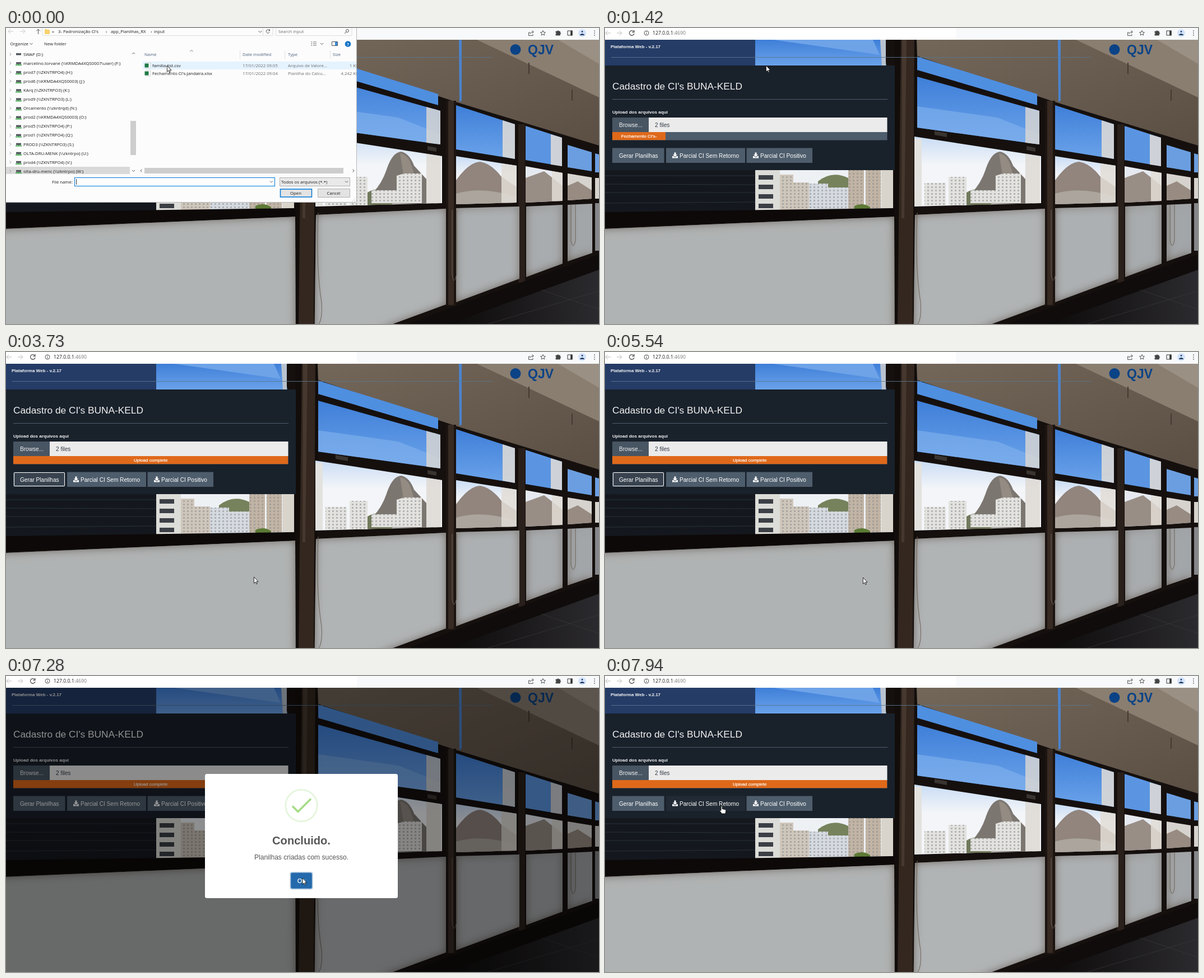
Write an HTML page that moves like this. It is 1058 by 529 pixels and loops after 8 s.

```html
<!DOCTYPE html>
<html lang="pt">
<head>
<meta charset="utf-8">
<title>Envio de planilhas</title>
<style>
html, body { margin: 0; width: 100%; height: 100%; overflow: hidden; background: #120e0c; }
svg { display: block; width: 1058px; height: 529px; font-family: "Liberation Sans", Arial, sans-serif; }
text { white-space: pre; }
.ui { font: 7.75px "Open Sans", "Noto Sans", sans-serif; fill: #1c1c1c; }
.dim { fill: #6d6d6d; }
.head { fill: #4c607a; }
.line { fill: none; stroke: #555; stroke-width: 1; }
.btn text { font-size: 10.1px; fill: #fff; }
.mid { text-anchor: middle; }
</style>
</head>
<body>
<svg viewBox="0 0 1058 529">
  <defs>
    <linearGradient id="sky" x2="0" y2="1"><stop stop-color="#3f7fd8"/><stop offset="1" stop-color="#6ba3ea"/></linearGradient>
    <linearGradient id="haze" x2="0" y2="1"><stop stop-color="#c9dcf5"/><stop offset=".4" stop-color="#f3f5f8"/></linearGradient>
    <linearGradient id="blind" x2="1" y2="1"><stop stop-color="#73675a"/><stop offset="1" stop-color="#5b4f44"/></linearGradient>
    <linearGradient id="floor" x2="1" y2="0"><stop stop-color="#0d0b0a"/><stop offset="1" stop-color="#2b2a2e"/></linearGradient>
    <pattern id="panes" width="7" height="6" patternUnits="userSpaceOnUse"><path d="M1 1h3v3h-3z" fill="#8b8d90" opacity=".55"/></pattern>
    <filter id="inset" x="0" y="0" width="1" height="1">
      <feComponentTransfer in="SourceAlpha"><feFuncA type="table" tableValues="1 0"/></feComponentTransfer>
      <feGaussianBlur stdDeviation="8"/>
      <feComposite in2="SourceAlpha" operator="in" result="rim"/>
      <feFlood flood-color="#65574a"/>
      <feComposite in2="rim" operator="in" result="edge"/>
      <feMerge><feMergeNode in="SourceGraphic"/><feMergeNode in="edge"/></feMerge>
    </filter>
    <clipPath id="barClip"><rect id="barRect" x="13" y="186" width="0" height="14.500"/></clipPath>
    <clipPath id="treeClip"><path d="M0 40H234V261H0z"/></clipPath>
    <clipPath id="listClip"><path d="M0 0H626V312H0z"/></clipPath>
    <g id="download" fill="#fff"><path d="M3.5 0h3v3.7h2.6L5 7.7.9 3.7h2.6z"/><path d="M0 6.6h2.4L5 9l2.6-2.4H10V10H0z"/></g>
  </defs>

  <!-- room with windows -->
  <g id="photo">
    <path d="M0 21H1058V529H0z" fill="#15100e"/>
    <path d="M0 21H268V68H0z" fill="#253c66"/>
    <path d="M268 21H495L502 68H268z" fill="url(#sky)"/>
    <path d="M300 21H478L490 48z" fill="#6ea3e8"/>
    <path d="M491 21H501V68H494z" fill="#b9c3cf"/>
    <path d="M0 254H268V329H0z" fill="#14181e"/>
    <path d="M0 264H268M0 279L268 280M0 294H268M0 313L268 311" stroke="#29313b" fill="none"/>
    <path d="M268 254H514V323L268 328z" fill="#eef1f4"/>
    <path d="M380 274Q405 254 434 268V300H380z" fill="#76825c"/>
    <g id="town">
      <path d="M268 254H312V327H268z" fill="#dcdcd8"/>
      <path d="M274 263h26v8h-26zM274 280h26v8h-26zM274 297h26v8h-26zM274 314h26v8h-26z" fill="#3c4046"/>
      <path d="M312 262H336V276H364V326H312z" fill="#cfc6bb"/>
      <path d="M364 278H398V285H434V324H364z" fill="#d5dae0"/>
      <path d="M434 254H462V323H434zM465 254H492V322H465z" fill="#c2b4a4"/>
      <path d="M312 262H336V276H364V326H312zM364 278H398V285H434V324H364zM434 254H462V323H434zM465 254H492V322H465z" fill="url(#panes)"/>
      <path d="M445 318q15-7 28 2v3h-28z" fill="#5c7a35"/>
      <path d="M493 254H514V322H493z" fill="#d9d4cb"/>
    </g>
    <path d="M516 21H556V529H516z" fill="#120d0b"/>
    <path d="M528 21H552L549 529H522z" fill="#33271f"/>
    <path d="M530 21H538L534 340H529z" fill="#46382e"/>

    <path d="M556 21H1058V210L802 132 557 50z" fill="url(#blind)"/>
    <path d="M840 21H1058V124z" fill="#8a7e71"/>
    <path d="M985 21H1058V64z" fill="#9b9084"/>
    <path d="M808 21H813V130L809 132z" fill="#4b83cd"/>
    <path d="M933 62V82M1010 110V130" stroke="#463a31" stroke-width="2"/>

    <path d="M557 51L771 118V138L557 75z" fill="#4f8fe0"/>
    <path d="M557 87L775 148V208L557 178z" fill="url(#sky)"/>
    <path d="M557 140L700 160 775 190V208L557 178z" fill="#82b2ef" opacity=".6"/>
    <path d="M552 194L778 229V313L552 319z" fill="url(#haze)"/>
    <path d="M655 294Q672 276 680 250Q690 222 705 221Q720 224 728 246L750 270V314H655z" fill="#7c7671"/>
    <path d="M703 224Q718 226 724 248L734 280H712z" fill="#948b82"/>
    <path d="M645 294Q660 284 676 294L690 316H645z" fill="#717a5c"/>
    <path d="M552 198H565V318H552zM570 277H608V317H570zM613 266H645V317H613zM652 290H697V264L710 260H742V313H652z" fill="#e3e2df"/>
    <path d="M570 277H608V317H570zM613 266H645V317H613zM652 290H697V264L710 260H742V313H652z" fill="url(#panes)"/>
    <path d="M750 141L775 148V208L750 205zM750 225L776 229V313H750z" fill="#ded9d3" opacity=".8"/>
    <path d="M588 184l22 4v7l-22-4zM752 211l16 3v7l-16-3z" fill="#3a3430"/>
    <path d="M785 130H803V497H785z" fill="#1b1411"/><path d="M789 130H799V495H789z" fill="#362a23"/>

    <path d="M803 138L908 172V234L803 217z" fill="url(#sky)"/>
    <path d="M803 229L911 246V312L803 315z" fill="url(#haze)"/>
    <path d="M803 272Q826 240 846 239Q866 242 884 266L911 284V312L803 315z" fill="#91857e"/>
    <path d="M803 296Q850 282 911 302V312L803 315z" fill="#aba59d"/>
    <path d="M886 165L908 172V234L886 230zM884 242L911 246V312H884z" fill="#e2ddd6" opacity=".85"/>
    <path d="M914 172H926V455H914z" fill="#2a201b"/>

    <path d="M927 175L992 196V247L927 236z" fill="#5b95e2"/>
    <path d="M927 247L993 259V309L927 312z" fill="#e6eaf0"/>
    <path d="M927 268L960 256 993 282V309L927 312z" fill="#998e86"/>
    <path d="M972 190L992 196V247L972 244zM974 256L993 259V309H974z" fill="#e2ddd6" opacity=".85"/>

    <path d="M1002 209L1045 222V256L1002 249zM1051 224L1058 226V258H1051z" fill="#6b9ee0"/>
    <path d="M1002 260L1045 267V305L1002 308zM1051 268H1058V305H1051z" fill="#d6d3ce"/>
    <path d="M1002 282L1020 274 1045 290V305L1002 308z" fill="#978b82"/>
    <path d="M690 540L785 503 1058 405V529z" fill="#0f0c0b"/>
    <path d="M790 529L1058 432V529z" fill="url(#floor)"/>
    <path d="M860 529L1058 470M955 468L1058 503" stroke="#3d3c40" fill="none" opacity=".6"/>

    <!-- frosted panels -->
    <g filter="url(#inset)">
      <path d="M-50 361L516 337 517 590H-50z" fill="#b0b3b3"/>
      <path d="M553 334L785 323V494L690 529 550 590z" fill="#b1b4b5"/>
      <path d="M803 322L916 319V448L803 490z" fill="#adb0b2"/>
      <path d="M928 319L993 316V421L928 445z" fill="#a9acae"/>
      <path d="M1002 316L1046 314V402L1002 417z" fill="#a3a6a8"/>
    </g>
    <path d="M0 329L516 322V337L0 357z" fill="#0d0908"/>
    <path d="M1051 313H1058V398H1051z" fill="#85878a"/>
    <path d="M557 330Q553 430 563 490Q565 520 558 529M796 325V440Q799 462 804 440V325M1008 316V380Q1012 398 1016 380V316" fill="none" stroke="#6c6257"/>
  </g>

  <!-- web page -->
  <text x="10" y="36" font-size="8" font-weight="700" fill="#f4f4f4">Plataforma Web - v.2.17</text>
  <path d="M11 52.5H867" stroke="#5a7690" stroke-width=".9"/>
  <circle cx="909" cy="38.5" r="9.5" fill="#0b4386"/>
  <text x="931" y="47" font-size="23" font-weight="700" fill="#0b4386">QJV</text>
  <path d="M0 67H517V254H0z" fill="#19212b"/>
  <text x="13" y="110" font-size="17.3" fill="#f3f3f3">Cadastro de CI's BUNA-KELD</text>
  <path d="M13 127.5H504" stroke="#4e5d6c"/>
  <text x="13" y="153" font-size="8.1" font-weight="700" fill="#f2f2f2">Upload dos arquivos aqui</text>
  <path d="M78 160H503.500V186H78z" fill="#ebebeb"/>
  <path d="M13 160H78V186H13z" fill="#485563"/>
  <text x="25" y="177" font-size="10.1" fill="#f0f0f0">Browse...</text>
  <text id="picked" x="89" y="177" font-size="10.1" fill="#333c46"></text>
  <g id="progress">
    <path d="M13 186H503.500V200.500H13z" fill="#4e5d6c"/>
    <g clip-path="url(#barClip)">
      <path d="M13 186H503.500V200.500H13z" fill="#df691a"/>
      <text id="barText" class="mid" y="196" font-size="8.1" fill="#fff" stroke="#fff" stroke-width=".2"></text>
    </g>
  </g>
  <g class="btn">
    <rect id="make" x="13" y="214.500" width="92.500" height="26.500"/>
    <rect id="makeRing" x="14.500" y="215.500" width="90" height="24" rx="1.5" fill="none" stroke="#fff"/>
    <text x="25" y="231.500">Gerar Planilhas</text>
    <rect id="none" x="109" y="214.500" width="141" height="26.500"/>
    <use href="#download" x="120" y="222.500"/><text x="133" y="231.500">Parcial CI Sem Retorno</text>
    <rect x="252.500" y="214.500" width="117.500" height="26.500" fill="#4e5d6c"/>
    <use href="#download" x="264" y="222.500"/><text x="277" y="231.500">Parcial CI Positivo</text>
  </g>

  <path id="shade" d="M0 21H1058V529H0z"/>

  <!-- alert -->
  <g id="alert">
    <rect x="355" y="175" width="344" height="222" rx="3.5" fill="#fff"/>
    <circle cx="527" cy="231.500" r="28.300" fill="none" stroke="#e4f5db" stroke-width="2.700"/>
    <path id="check" pathLength="1" stroke-dasharray="1 2" d="M512 233.500L521 242.500 543 220.500" fill="none" stroke="#a5dc86" stroke-width="3.600" stroke-linecap="round"/>
    <g class="mid" fill="#575757">
      <text x="527" y="301" font-size="20.1" font-weight="700">Concluido.</text>
      <text x="527" y="328" font-size="12.050">Planilhas criadas com sucesso.</text>
      <rect x="506.500" y="350" width="41" height="31.500" rx="4" fill="#aec6de"/>
      <rect id="ok" x="508.200" y="351.700" width="37.600" height="28" rx="2.700"/>
      <text x="527" y="369.500" font-size="11.2" fill="#fff" stroke="#fff" stroke-width=".25">Ok</text>
    </g>
  </g>

  <!-- browser bar -->
  <path d="M0 0H1058V21H0z" fill="#f8f9fa"/><path d="M0 0H626V21H0z" fill="#fff"/>
  <g class="line">
    <path d="M10 9H1M5 5L1 9 5 13M21 9H30M26 5L30 9 26 13" stroke="#bbb"/>
    <path d="M51 6A4.300 4.300 0 1 0 52 10M52 4V7.500H48.500" stroke-width="1.3"/>
    <circle cx="74" cy="9" r="4"/><path d="M74 8V11.500M74 6V7"/>
    <path d="M935 8H932.500V13.500H940V11M935 11Q935 7 941 7M938.500 4.500L941.500 7 938.500 9.500"/>
    <path d="M958 4.500L959.300 7.500 962.500 7.800 960 10 960.800 13 958 11.300 955.200 13 956 10 953.500 7.800 956.700 7.500z"/>
    <path d="M981 6H983.500Q985 3 986.500 6H988.500V8Q991 9.300 988.500 11V13H981V11Q983 9.300 981 8z" fill="#444"/>
    <path d="M1002 5H1010.500V13H1002z" stroke="#333"/><path d="M1007.500 5H1010.500V13H1007.500z" fill="#333"/>
    <circle cx="1028" cy="9" r="7" fill="#d3e3fd" stroke="none"/>
    <path d="M1024 12.500Q1028 8.500 1032 12.500zM1028 5.500a1 1 0 1 0 .1 0" fill="#27405f" stroke="#27405f"/>
    <path d="M1050 4.500v1.500M1050 8.300v1.500M1050 12v1.500" stroke-width="1.7"/>
  </g>
  <text class="ui" x="85" y="12" style="font-size:8.7px">127.0.0.1<tspan fill="#777">:4690</tspan></text>

  <!-- file dialog -->
  <g id="dialog" class="ui" clip-path="url(#listClip)">
    <path d="M0 0H626V312H0z" fill="#fcfcfc"/>
    <path d="M65 -2V13.500H476V-2M458.500 -2V13M481.500 -2V13.500H617V-2" class="line" style="stroke:#dedede"/>
    <g class="line">
      <path d="M13 6H4M8 2L4 6 8 10M25 6H34M30 2L34 6 30 10" stroke="#c8c8c8"/>
      <path d="M57.500 11V2M54 5.500L57.500 2 61 5.500"/>
      <path d="M450.500 5L453.500 8 456.500 5M470 4A3.200 3.200 0 1 0 470.300 7.500M470.500 2V5H468"/>
      <circle cx="609" cy="5" r="2.500"/><path d="M607 7L604 10"/>
      <path d="M42.500 27L45 29.500 47.500 27M561 27L563.500 29.500 566 27" />
      <path d="M544 25h2.500M544 28h2.500M544 31h2.500M548 25h6M548 28h6M548 31h6" stroke="#777"/>
      <path d="M581.500 24.500h10v7h-10z"/><path d="M587 25h4v6h-4z" style="fill:#3e8ddd;stroke:none"/>
      <path d="M328 42L331 39.500 334 42" stroke="#888"/>
      <path d="M417.500 40V55M497.500 40V55M578.500 40V55" style="stroke:#e2e2e2"/>
      <path d="M225 46.500L227.500 44 230 46.500M225 254L227.500 256.500 230 254M242.500 252.500L240 255 242.500 257.500M618.500 252.500L621 255 618.500 257.500"/>
    </g>
    <path d="M69 2h3l1 1h5v8h-9z" fill="#f7d26b"/>
    <circle cx="610" cy="28.500" r="5.300" fill="#1173c7"/><text class="mid" x="610" y="31.500" style="fill:#fff;font-weight:700">?</text>
    <path d="M222 166H232V227H222zM247 250H602V260H247z" fill="#cdcdcd"/>
    <g id="tree" clip-path="url(#treeClip)"></g>
    <g id="files"></g>
    <rect id="nameBox" x="122.500" y="267.500" width="357" height="15" fill="#fff"/>
    <path id="caret" d="M125.500 270V280" stroke="#000" stroke-width=".8"/>
    <text id="fileName" x="125" y="278"></text>
    <path d="M488.500 267.500H613.500V282.500H488.500z" fill="#e9e9e9" stroke="#b0b0b0"/>
    <path d="M489.500 288H545.500V302H489.500z" fill="#e3e3e3" stroke="#0078d7" stroke-width="1.500"/>
    <path d="M556.500 287.500H613.500V302.500H556.500z" fill="#e3e3e3" stroke="#b0b0b0"/>
    <path class="line" d="M471 273.500L473.500 276 476 273.500M605 273.500L607.500 276 610 273.500"/>
    <path d="M622.500 304v6M620 307v3M618 309v1" stroke="#bbb" stroke-dasharray="1 1.500"/>
    <path d="M0 311.500H625.500V0" fill="none" stroke="#a5a5a5" stroke-width=".8"/>
  </g>

  <g id="cursor">
    <path id="arrow" d="M.4 0V11.300L3 8.900 4.700 12.700 6.300 12 4.700 8.300H8z" fill="#fff" stroke="#000" stroke-width=".8"/>
    <path id="hand" d="M-1 1.200Q0-.6 1.200 1.200V5.500L6.500 6.700Q8 7.200 7.800 9L6.800 14H.3L-3.200 9Q-3.700 7.500-2.300 7.500L-1 8.800z" fill="#fff" stroke="#000" stroke-width=".8"/>
  </g>
</svg>
<script>
const $ = id => document.getElementById(id);
function add(parent, tag, attrs, text) {
  const node = document.createElementNS("http://www.w3.org/2000/svg", tag);
  for (const key in attrs) node.setAttribute(key, attrs[key]);
  if (text) node.textContent = text;
  return parent.appendChild(node);
}
const set = (id, key, value) => $(id).setAttribute(key, value);
const show = (id, on) => set(id, "visibility", on ? "visible" : "hidden");

const label = (x, y, text, cls = "") => add($("dialog"), "text", { x, y, class: cls }, text);
label(82, 8.5, "«"); label(93, 8.5, "3- Padronização CI's"); label(178, 8.5, "›");
label(187, 8.5, "app_Planilhas_RX"); label(258, 8.5, "›"); label(264, 8.5, "input");
label(486, 8.5, "Search input", "dim");
label(7.5, 31, "Organize"); label(68, 31, "New folder");
[[247, "Name"], [422, "Date modified"], [503, "Type"], [583, "Size"]].forEach(([x, s]) => label(x, 50, s, "head"));
label(82, 277.5, "File name:"); label(491, 277.5, "Todos os arquivos (*.*)");
label(517, 297.5, "Open", "mid"); label(584.5, 297.5, "Cancel", "mid");

const farm = "KRMDA4XQS000", host = "ZKNTRPO";
const drives = [
  ["SWAP", "", "D"], ["marcelino.torvane", farm + "7\\user", "F"], ["prod7", host + 4, "H"],
  ["prod6", farm + 3, "J"], ["KArq", host + 3, "K"], ["prod9", host + 3, "L"],
  ["Orcamento", "zkntrqd", "N"], ["prod2", farm + 3, "O"], ["prod5", host + 4, "P"],
  ["prod1", host + 4, "Q"], ["PROD3", host + 3, "S"], ["OLTA-DRU-MENK", "zkntrpo", "U"],
  ["prod4", host + 4, "V"], ["olta-dru-menc", "zkntrpo", "W"]
];
add($("tree"), "rect", { y: 248, width: 221, height: 14, fill: "#d9d9d9" });
const chevrons = add($("tree"), "g", { class: "line" });
drives.forEach(([name, server, letter], i) => {
  const y = 47 + i * 16.07;
  add(chevrons, "path", { d: `M6.500 ${y - 2.500}l2.500 2.500-2.500 2.500`, style: "stroke:#a0a0a0" });
  add($("tree"), "path", { d: `M18 ${y - 2}h9v3.500h-9z`, fill: "#50565b" });
  if (server) add($("tree"), "path", { d: `M17 ${y + 3}h11M22.500 ${y + 1}v2`, stroke: "#3ea34a", "stroke-width": 1.8 });
  add($("tree"), "text", { x: 31, y: y + 2.8 }, name + (server && ` (\\\\${server})`) + ` (${letter}:)`);
});

const bigFile = "Fechamento CI's-Jandaira.xlsx", smallFile = "familia-list.csv";
const rows = [
  [smallFile, "17/01/2022 09:05", "Arquivo de Valore...", "1 KB"],
  [bigFile, "17/01/2022 09:04", "Planilha do Calcu...", "4.242 KB"]
].map(([name, date, kind, size], i) => {
  const g = $("files"), y = 67 + i * 14;
  const back = add(g, "rect", { x: 244, y: y - 7, width: 382, height: 14 });
  add(g, "path", { d: `M250 ${y - 5}h8v10h-8z`, fill: "#fff", stroke: "#bbb", "stroke-width": .6 });
  add(g, "rect", { x: 247.5, y: y - 3.5, width: 7, height: 7, fill: "#1f7a46" });
  add(g, "text", { x: 261, y: y + 2.8 }, name);
  add(g, "text", { x: 422, y: y + 2.8, class: "dim" }, date);
  add(g, "text", { x: 503, y: y + 2.8, class: "dim" }, kind);
  add(g, "text", { x: 629, y: y + 2.8, class: "dim", "text-anchor": "end" }, size);
  return back;
});

const ticks = [0, 150, 300, 580, 1010, 1160, 1300, 1420, 1550, 1670, 1820, 1970, 2120, 2240, 2360, 2480,
  2630, 2770, 2900, 3460, 3580, 3730, 5540, 5690, 5810, 5930, 6080, 6200, 6350, 6470, 6620, 6770, 6890,
  7040, 7160, 7280, 7430, 7550, 7700, 7820, 7940];

// Keys are [time, value, ...]; values run straight from key to key.
function track(keys, t) {
  const i = keys.findLastIndex(k => k[0] <= t);
  if (i < 0) return keys[0].slice(1);
  const a = keys[i], b = keys[i + 1] || a;
  const p = b === a ? 0 : (t - a[0]) / (b[0] - a[0]);
  return a.slice(1).map((v, j) => v + (b[j + 1] - v) * p);
}
const pointer = [[0, 287, 67], [1970, 287, 67], [2360, 18, 203], [2480, 66, 239], [2630, 73, 223], [2900, 73, 223],
  [3580, 368, 422], [3730, 442, 402], [5540, 460, 403], [5810, 822, 338], [5930, 817, 330], [6200, 817, 330],
  [6470, 838, 330], [6620, 689, 337], [6890, 566, 357], [7160, 528.5, 361], [7280, 528.5, 361],
  [7550, 265, 265], [7940, 208, 232]];
const barEnd = [[1160, 13], [1300, 40], [1420, 108], [1670, 353], [1820, 461], [1970, 499], [2120, 503.5]];
const shade = [[5540, 0], [5690, .15], [5810, .35], [5930, .41], [7280, .41], [7550, 0]];
const zoom = [[5690, .7], [5810, .85], [5930, 1.04], [6080, .96], [6200, 1], [7280, 1], [7550, .6]];
const fade = [[5540, 0], [5810, 1], [7280, 1], [7550, 0]];
const tickMark = [[6080, 0], [6470, 1]];
const chevronFade = [[0, 1], [150, .7], [300, .4], [580, 0]];

function draw(t) {
  const between = (a, b) => t >= a && t < b;

  set("dialog", "display", t < 1010 ? "inline" : "none");
  show("caret", t < 150);
  chevrons.setAttribute("opacity", track(chevronFade, t)[0]);
  set("nameBox", "stroke", t < 150 ? "#0078d7" : "#b0b0b0");
  $("fileName").textContent = t < 150 ? "" : t < 300 ? smallFile : `"${bigFile}" "${smallFile}"`;
  rows[0].setAttribute("fill", t < 150 ? "#e5f3ff" : "#cce8ff");
  rows[1].setAttribute("fill", t < 300 ? "none" : "#cce8ff");

  $("picked").textContent = t < 1160 ? "No file selected" : "2 files";
  const end = track(barEnd, t)[0], done = t >= 1550;
  show("progress", t >= 1160);
  set("barRect", "width", end - 13);
  set("barText", "x", Math.max((end + 13) / 2, 46));
  $("barText").textContent = done ? "Upload complete" : bigFile.split("-")[0] + "-";

  const focused = between(2900, 5690) || between(7550, 7820);
  set("make", "fill", between(2770, 3460) ? "#28323c" : focused ? "#38434f" : "#4e5d6c");
  show("makeRing", focused);
  set("none", "fill", t >= 7940 ? "#222b35" : t >= 7820 ? "#39444f" : "#4e5d6c");

  set("shade", "opacity", track(shade, t)[0]);
  const s = track(zoom, t)[0], mark = track(tickMark, t)[0];
  set("alert", "opacity", track(fade, t)[0]);
  set("alert", "transform", `translate(527 286) scale(${s}) translate(-527 -286)`);
  set("check", "stroke-dashoffset", 1 - mark);
  set("check", "opacity", mark > 0 ? 1 : 0);
  set("ok", "fill", t >= 7160 ? "#2469ab" : t >= 7040 ? "#2b78c1" : "#3085d6");

  const [x, y] = track(pointer, t);
  const hand = between(2480, 3460) || t >= 7820;
  set("cursor", "transform", `translate(${x} ${y})`);
  show("arrow", !hand);
  show("hand", hand);
}

const start = performance.now();
let last = -1;
function frame(now) {
  const t = Math.max(0, now - start) % 8000;
  const tick = ticks.findLast(v => v <= t);
  if (tick !== last) draw(last = tick);
  requestAnimationFrame(frame);
}
draw(0);
requestAnimationFrame(frame);
</script>
</body>
</html>
```
